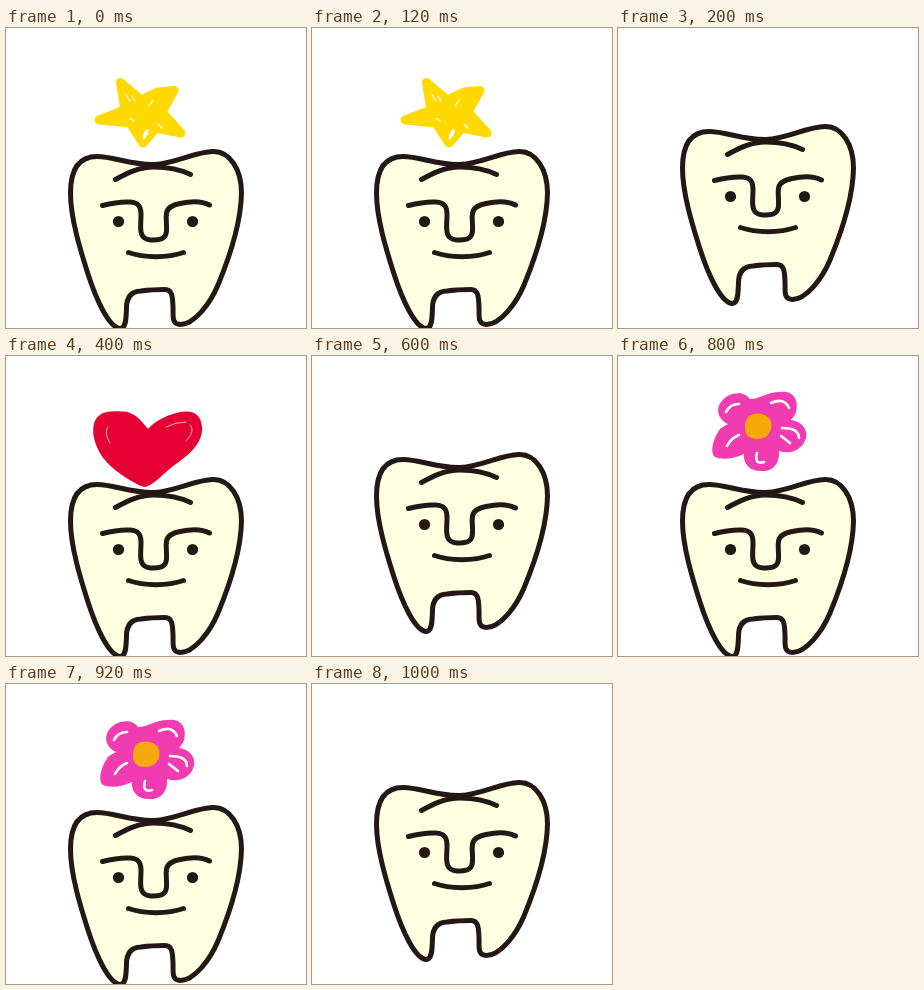
Recreate the animation shown at these times as an HTML page. Size 300 by 300 pixels, loop 1200 ms.

```html
<!DOCTYPE html>
<html lang="en">
<head>
<meta charset="utf-8">
<title>Bouncing tooth</title>
<style>
  html, body { margin: 0; width: 100%; height: 100%; overflow: hidden; background: #fff; }
  svg { display: block; width: 100vw; height: 100vh; }
  .line { fill: none; stroke: #231815; stroke-width: 5; stroke-linecap: round; stroke-linejoin: round; }
  .gap { fill: none; stroke: #fff; stroke-linecap: round; stroke-linejoin: round; }
  .prop { visibility: hidden; }
</style>
</head>
<body>
<svg viewBox="0 0 300 300">
  <g id="star" class="prop">
    <path fill="#ffd900" stroke="#ffd900" stroke-width="9" stroke-linejoin="round"
      d="M114.500 54.500L135 72L152 64L168 62.500L156 84L175 105L150 100L137 115L124 95L93 92L119 82Z"/>
    <path fill="#fff" d="M137 112Q136 105 141 101Q144 102 142 106Q140 110 137 112Z"/>
    <g class="gap" stroke-width="1.2">
      <path d="M120 67L124 73M126 68L129 73M147 72L143 78M124 90L128 93M152 96L156 100"/>
    </g>
  </g>

  <g id="heart" class="prop">
    <path fill="#e60033" d="M142 73C148 66 158 60 172 56.500C187 53 195 58 196 71C197 85 187 96 170 108C158 116 147 131 138 131C131 129 118 121 108 113C97 104 91 94 88 82C85 66 91 56 105 55.500C114 55 122 55 126 58C133 61 137 67 142 73Z"/>
    <g class="gap" stroke-width="1" opacity=".7">
      <path d="M102 71C99 75 100 80 104 87M184 69C188 73 186 79 180 85M160 71Q170 66 180 66"/>
    </g>
  </g>

  <g id="flower" class="prop">
    <path fill="#f03cb0" d="M132 43C142 43 149 36 162 36C176 34 181 45 178 56C177 60 174 62 173 64C183 65 190 73 188 82C185 93 174 99 161 95C162 105 157 115 145 115C132 116 125 108 126 98C116 103 104 104 97 101C91 96 96 80 103 72L110 68C101 64 97 54 103 46C110 36 126 34 132 43Z"/>
    <g class="gap" stroke-width="2.600">
      <path d="M108 56Q112 48 121 48M153 47Q166 41 171 52M164 72Q181 72 181 82M163 80L172 87M139 97Q136 109 146 106M109 90Q113 82 121 79"/>
    </g>
    <path fill="#f6a90a" d="M131 60C137 56 146 57 151 62C155 67 154 75 149 80C143 84 133 84 129 79C126 74 126 65 131 60Z"/>
  </g>

  <g id="tooth" class="line">
    <path fill="#ffffe2" d="M64.500 140C64.500 118 72 103.500 91 103.500C108 103.500 124 112 148 111.500C170 110.500 188 99 207 98.500C224 98 235.500 117 235.500 140C235 170 224 203 212 232C204 251 188 271.500 174.500 271.500C165 271.500 167.500 262 167 254C166.500 246 167 236.500 159 236.500C151 236.500 142 237 135 238C124 238.500 120.500 246 120.500 255C120 264 120.500 275 114.500 275.500C103 275 90 246 82 221C74 196 64.500 165 64.500 140Z"/>
    <path d="M109.500 126.500C121 120 133 114 148 114C163 114 173 116 184.500 121.500"/>
    <path d="M96.500 152.500C106 150 116 148.500 124 149C133 149.500 135 154 135 162C135 169 134 173 135 179C136 184.500 139 187 148 187C157 187 160 184 160.500 178C161 171 159.500 166 160.500 160C161.500 154 167 152 174 150.500C185 148 196 148 203.500 152"/>
    <path d="M122.500 199.500C138 205 162 205 177.500 199.500"/>
    <g fill="#231815" stroke="none">
      <circle cx="112.500" cy="168.500" r="5.600"/>
      <circle cx="186.500" cy="168.500" r="5.600"/>
    </g>
  </g>
</svg>
<script>
  const STEP = 200;
  const DROP = 25;
  const poses = ["star", null, "heart", null, "flower", null];
  const byId = id => document.getElementById(id);

  // Each value holds for one step, then jumps.
  function hold(id, toFrame) {
    const frames = poses.map((prop, i) => ({
      ...toFrame(prop), offset: i / poses.length, easing: "steps(1, end)"
    }));
    frames.push({ ...toFrame(poses[poses.length - 1]), offset: 1 });
    byId(id).animate(frames, { duration: STEP * poses.length, iterations: Infinity })
      .startTime = 0;
  }

  hold("tooth", prop => ({ transform: `translateY(${prop ? DROP : 0}px)` }));
  for (const id of poses.filter(Boolean)) {
    hold(id, prop => ({ visibility: prop === id ? "visible" : "hidden" }));
  }
</script>
</body>
</html>
```
